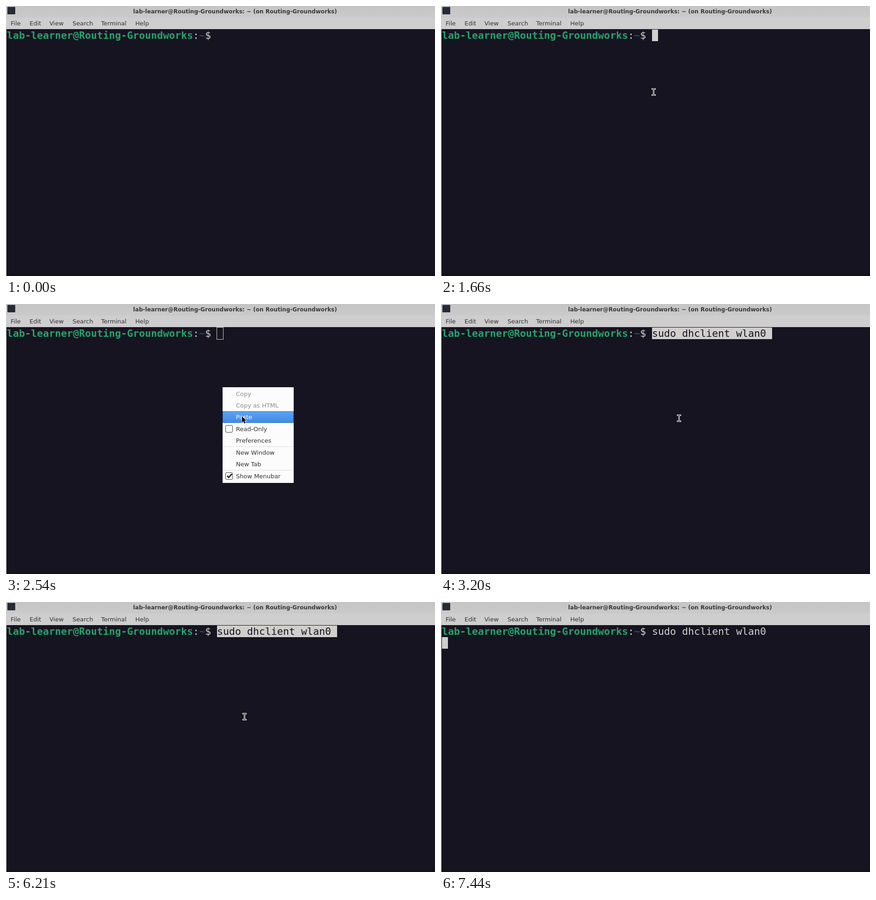
An HTML page for the animation above (8 s loop, 929 by 584 pixels).

```html
<!DOCTYPE html>
<html lang="en">
<head>
<meta charset="utf-8">
<title>Terminal</title>
<style>
  html, body { margin: 0; width: 100%; height: 100%; overflow: hidden; background: #171421; }
  svg { display: block; }
  text { font: 13px "DejaVu Sans", sans-serif; fill: #323232; white-space: pre; }
  #title { font-size: 12.1px; font-weight: bold; fill: #3a3a3a; text-anchor: middle; }
  .mono text { font: 21.6px "DejaVu Sans Mono", monospace; fill: #d0cfcc; }
  .mono .user { font-weight: bold; fill: #26a269; }
  .mono .path { font-weight: bold; fill: #22505a; }
  .mono .picked { fill: #171421; }
  .off { fill: #8b8b8b; }
  .hot { fill: #fff; }
  .box { fill: #fcfcfc; stroke: #3a3a3a; }
</style>
</head>
<body>
<svg width="929" height="584" viewBox="0 0 929 584">
  <defs>
    <linearGradient id="bar" x2="0" y2="1">
      <stop stop-color="#c5c5c5"/><stop offset="1" stop-color="#cacaca"/>
    </linearGradient>
    <linearGradient id="blue" x2="0" y2="1">
      <stop stop-color="#5da3f3"/><stop offset="1" stop-color="#3d8be6"/>
    </linearGradient>
  </defs>

  <rect width="929" height="584" fill="#171421"/>
  <rect y="580" width="929" height="4" fill="#13111c"/>
  <rect width="929" height="25" fill="url(#bar)"/>
  <rect y="25" width="929" height="25" fill="#cecece"/>
  <rect y="50" width="1" height="534" fill="#cecece"/>
  <rect x="3" y="2" width="17" height="16" rx="1" fill="#252b37"/>
  <text id="title" x="496" y="16">lab-learner@Routing-Groundworks: ~ (on Routing-Groundworks)</text>
  <g id="menubar"></g>

  <g class="mono">
    <text class="user" x="2" y="71">lab-learner@Routing-Groundworks</text>
    <text x="405" y="71">:</text>
    <text class="path" x="418" y="71">~</text>
    <text x="431" y="71">$</text>
    <rect id="selection" x="457" y="51" width="247" height="25" fill="#d0cfcc"/>
    <text id="command" x="457" y="71">sudo dhclient wlan0</text>
  </g>
  <rect id="block" width="13" height="25" fill="#d0cfcc"/>
  <rect id="hollow" x="456.5" y="50.5" width="14" height="26" fill="none" stroke="#d0cfcc"/>

  <g id="menu">
    <rect x="469" y="180" width="154" height="207" fill="#fcfcfc"/>
    <path d="M469 257.5h154M469 308.5h154M469 359.5h154" stroke="#dcdcdc"/>
    <rect id="hover" x="469.5" y="232.5" width="153" height="24" fill="url(#blue)" stroke="#2b73c9"/>
    <rect class="box" x="475.5" y="262.5" width="15" height="15" rx="2.5"/>
    <rect class="box" x="475.5" y="364.5" width="15" height="15" rx="2.5"/>
    <path d="M479 371.5l3.2 3.5 7-7.5" fill="none" stroke="#2d2d2d" stroke-width="3"/>
    <g id="items"></g>
  </g>

  <path id="arrow" d="M0 0V13.2L3 10.4 5.2 15.4 7.4 14.4 5.2 9.6H9.4Z"
        stroke="#fff" stroke-width="1.6" paint-order="stroke"/>
  <g id="beam" fill="none" stroke-linecap="square">
    <path d="M-3-6.5h6M0-6.5v13M-3 6.5h6" stroke="#fff" stroke-width="3"/>
    <path d="M-3-6.5h6M0-6.5v13M-3 6.5h6" stroke="#111"/>
  </g>
</svg>

<script>
const LOOP = 8000;
const $ = id => document.getElementById(id);
const show = (id, on) => $(id).setAttribute("visibility", on ? "visible" : "hidden");
const within = (t, a, b) => t >= a && t < b;

function label(parent, x, y, text, style = "") {
  const el = document.createElementNS("http://www.w3.org/2000/svg", "text");
  el.setAttribute("x", x);
  el.setAttribute("y", y);
  el.setAttribute("class", style);
  el.textContent = text;
  return $(parent).appendChild(el);
}

[["File", 10], ["Edit", 51], ["View", 94], ["Search", 144], ["Terminal", 206], ["Help", 280]]
  .forEach(([text, x]) => label("menubar", x, 42, text));

label("items", 498, 199, "Copy", "off");
label("items", 498, 224, "Copy as HTML", "off");
const paste = label("items", 498, 249, "Paste");
[["Read-Only", 275], ["Preferences", 300], ["New Window", 326], ["New Tab", 351], ["Show Menubar", 377]]
  .forEach(([text, y]) => label("items", 498, y, text));

// Progress 0..1 in the given number of held steps.
function stepped(t, start, end, count) {
  const k = Math.floor((t - start) / (end - start) * (count - 1) + 0.01);
  return Math.max(0, Math.min(1, k / (count - 1)));
}
const mix = (a, b, u) => a + (b - a) * u;
const easeOut = (u, power) => 1 - (1 - u) ** power;
const smooth = u => u * u * (3 - 2 * u);

function pointer(t) {
  if (t < 710 || t >= 7240) return null;
  if (t < 1660) {
    const u = stepped(t, 710, 1510, 12);
    return [mix(48, 475, easeOut(u, 2.37)), mix(266, 175, easeOut(u, 2.95))];
  }
  if (t < 1810) return [460, 186];
  if (t < 2690) {
    const u = smooth(stepped(t, 1810, 2610, 12));
    return [mix(468, 512, u), mix(179, 245, u)];
  }
  if (t < 2910) return [512, 246];
  if (t < 6800) {
    const u = easeOut(stepped(t, 2910, 3490, 8), 2);
    return [mix(512, 516, u), mix(246, 248, u)];
  }
  const u = smooth((stepped(t, 6800, 7240, 7) * 6 + 1) / 7);
  return [mix(516, -20, u), mix(248, 70, u)];
}

function draw(t) {
  const open = within(t, 1810, 2910);
  const pasted = t >= 2980;
  const selected = within(t, 2980, 6290);
  const entered = t >= 6360;

  show("hollow", open);
  show("selection", selected);
  show("command", pasted);
  $("command").setAttribute("class", selected ? "picked" : "");

  const lit = within(t, 150, 780) || within(t, 1370, 1810) || within(t, 2910, 3770)
    || within(t, 6210, 6870) || t >= 7440;
  show("block", lit);
  $("block").setAttribute("x", entered ? 2 : pasted ? 704 : 457);
  $("block").setAttribute("y", entered ? 76 : 51);

  const at = pointer(t);
  const hot = open && at[1] >= 232;
  // Children must not outlive a hidden menu, so hover depends on it too.
  show("menu", open);
  show("hover", hot);
  paste.setAttribute("class", hot ? "hot" : "");

  show("arrow", open);
  show("beam", at && !open);
  if (at) {
    const [x, y] = at.map(Math.round);
    // The beam's stem is centred on a pixel column.
    if (open) $("arrow").setAttribute("transform", `translate(${x} ${y})`);
    else $("beam").setAttribute("transform", `translate(${x + 0.5} ${y})`);
  }
}

const start = performance.now();
function tick() {
  draw((performance.now() - start) % LOOP);
  requestAnimationFrame(tick);
}
draw(0);
requestAnimationFrame(tick);
</script>
</body>
</html>
```
